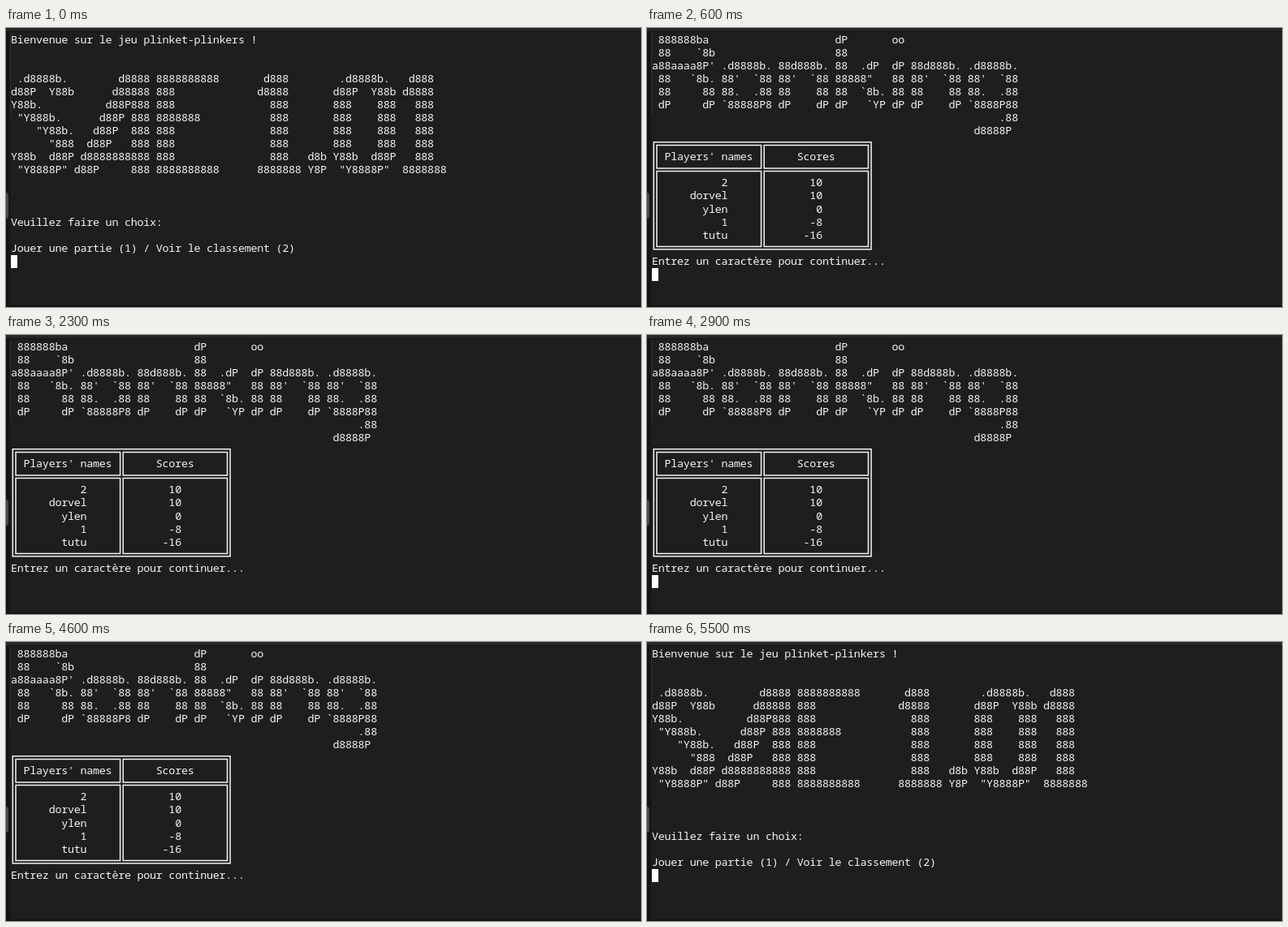
An HTML page that plays this animation: 782 by 344 pixels, repeating every 5.8 s.

```html
<!DOCTYPE html>
<html lang="fr">
<head>
<meta charset="utf-8">
<title>Terminal</title>
<style>
  :root { --cell: 7.78px; --row: 16.06px; --loop: 5800ms; }
  html, body { margin: 0; width: 100%; height: 100%; overflow: hidden; background: #1e1e1e; }
  body { position: relative; }
  div, pre, svg, i { position: absolute; }

  .edge-left { left: 0; top: 0; width: 5px; height: 100%; background: #1a1217; }
  .edge-top { left: 0; top: 0; width: 100%; height: 4px; background: #282728; border-bottom: 1px solid #141314; }
  .edge-bottom { left: 0; bottom: 0; width: 100%; height: 2px; background: #161214; }
  .edge-light { left: 5px; top: 6px; width: 1px; height: 101px; background: #343133; }
  .handle { left: -4px; top: 203px; width: 7px; height: 32px; border-radius: 4px; background: #4b484a; }

  .screen { inset: 0; animation: var(--loop) step-end infinite; }
  .menu { animation-name: menu; }
  .scores { animation-name: scores; }

  pre {
    margin: 0; left: 6px; top: 5.7px; color: #f5f5f5;
    font: 13.4px/var(--row) "Noto Sans Mono", "DejaVu Sans Mono", monospace;
    letter-spacing: -0.26px; font-variant-ligatures: none;
  }
  .key { animation: var(--loop) step-end infinite; }
  .menu .key { top: calc(5.7px + 17 * var(--row)); animation-name: key-menu; }
  .scores .key { top: calc(5.7px + 18 * var(--row)); animation-name: key-scores; }

  .cursor { left: 6px; width: 8px; height: 16px; background: #fff; animation: var(--loop) step-end infinite; }
  .menu .cursor { top: 279.5px; animation-name: move-menu; }
  .scores .cursor { top: 295.5px; animation-name: move-scores, blink; }

  svg { inset: 0; fill: none; stroke: #f5f5f5; stroke-width: 1.5; }

  @keyframes menu { 0%, 94.82% { opacity: 1 } 10.34%, 94.81% { opacity: 0 } 100% { opacity: 1 } }
  @keyframes scores { 0%, 94.82%, 100% { opacity: 0 } 10.34% { opacity: 1 } }
  @keyframes key-menu { 0%, 10.34%, 100% { opacity: 0 } 1.72% { opacity: 1 } }
  @keyframes key-scores { 0%, 94.82%, 100% { opacity: 0 } 91.37% { opacity: 1 } }
  @keyframes move-menu {
    0%, 10.34%, 100% { transform: none }
    1.72% { transform: translateX(var(--cell)) }
  }
  @keyframes move-scores {
    0%, 94.82%, 100% { transform: none }
    91.37% { transform: translateX(var(--cell)) }
  }
  @keyframes blink {
    0%, 29.31%, 49.99%, 70.68%, 86.2%, 100% { opacity: 1 }
    18.96%, 39.65%, 58.62%, 79.31% { opacity: 0 }
  }
</style>
</head>
<body>
<div class="edge-left"></div>
<div class="edge-top"></div>
<div class="edge-bottom"></div>
<div class="edge-light"></div>
<div class="handle"></div>

<div class="screen menu">
<pre>Bienvenue sur le jeu plinket-plinkers !


 .d8888b.        d8888 8888888888       d888        .d8888b.   d888
d88P  Y88b      d88888 888             d8888       d88P  Y88b d8888
Y88b.          d88P888 888               888       888    888   888
 "Y888b.      d88P 888 8888888           888       888    888   888
    "Y88b.   d88P  888 888               888       888    888   888
      "888  d88P   888 888               888       888    888   888
Y88b  d88P d8888888888 888               888   d8b Y88b  d88P   888
 "Y8888P" d88P     888 8888888888      8888888 Y8P  "Y8888P"  8888888



Veuillez faire un choix:

Jouer une partie (1) / Voir le classement (2)</pre>
<pre class="key">2</pre>
<i class="cursor"></i>
</div>

<div class="screen scores">
<pre> 888888ba                    dP       oo
 88    `8b                   88
a88aaaa8P' .d8888b. 88d888b. 88  .dP  dP 88d888b. .d8888b.
 88   `8b. 88'  `88 88'  `88 88888"   88 88'  `88 88'  `88
 88     88 88.  .88 88    88 88  `8b. 88 88    88 88.  .88
 dP     dP `88888P8 dP    dP dP   `YP dP dP    dP `8888P88
                                                       .88
                                                   d8888P

  Players' names       Scores

           2             10
      dorvel             10
        ylen              0
           1             -8
        tutu            -16

Entrez un caractère pour continuer...</pre>
<svg width="782" height="344" viewBox="0 0 782 344">
  <rect x="8.3" y="140.7" width="267.8" height="132.2"/>
  <path d="M12 144.4H140.6V172.9H12ZM144.2 144.4H272.5V172.9H144.2ZM12 176.6H140.6V269.4H12ZM144.2 176.6H272.5V269.4H144.2Z"/>
</svg>
<pre class="key">1</pre>
<i class="cursor"></i>
</div>
</body>
</html>
```
